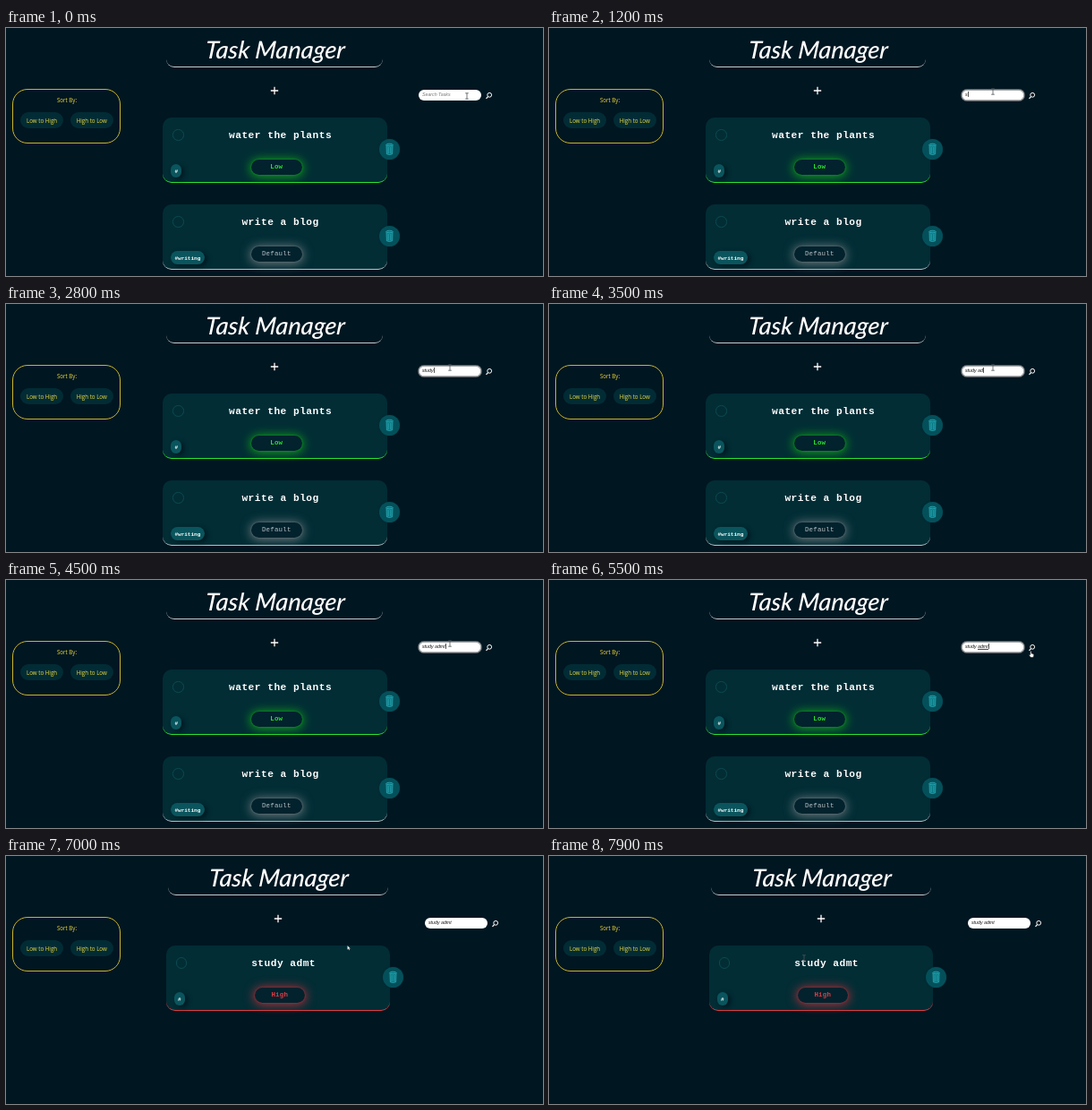
These frames come from a looping animation (600 px wide and 277 px high, 8000 ms). An HTML page:

```html
<!DOCTYPE html>
<html lang="en">
<head>
<meta charset="utf-8">
<title>Task Manager</title>
<style>
html, body { margin: 0; width: 100%; height: 100%; overflow: hidden; background: #001621; }
#app { position: relative; width: 600px; height: 277px; overflow: hidden; font: 6.2px "Open Sans", sans-serif; }
#app * { position: absolute; box-sizing: border-box; white-space: pre; }
#app .t { transform: translate(-50%, -50%); }
.mid, .find, #cards, svg { left: 0; top: 0; }
.title { left: 301px; top: 22.9px; color: #fff; font: italic 500 27px Lato, sans-serif; }
#app .title { transform: translate(-50%, -50%) skewX(-5deg); }
.line { left: 179px; top: 5px; width: 242px; height: 39px; border-bottom: 1px solid #c5cccf; border-radius: 9px; }
.res .line { left: 177px; width: 246px; }
.res .mid { left: 3.5px; }
.res .find { left: 7px; }
.sort { left: 7px; top: 68px; width: 121px; height: 61px; border: 1px solid #c9b52c; border-radius: 17px; }
.sort, .btn { color: #f0dc3c; }
.btn { top: 25px; width: 48.5px; height: 18px; border-radius: 9px; background: #022c35; }
.card { left: 175px; width: 250.5px; height: 73px; border-radius: 10px; background: #022d35; border-bottom: 1.2px solid var(--c); }
.check { left: 11px; top: 13px; width: 12.5px; height: 12.5px; border: 1px solid #0c4a50; border-radius: 50%; }
.name { left: 131.6px; top: 20px; color: #fff; font: bold 11.2px "Liberation Mono", monospace; letter-spacing: .48px; }
.level { left: 99px; top: 46.5px; width: 56.5px; height: 17.5px; border-radius: 9px; background: #02222d;
  box-shadow: 0 0 2px var(--g), 0 1px 12px 1px var(--g); color: var(--c); font: 7.4px "Liberation Mono", monospace; letter-spacing: .24px; }
.bold { font-weight: bold; }
.tag { left: 9.2px; top: 52px; height: 15px; border-radius: 7.5px; background: #0a555d;
  box-shadow: 3px 2px 5px #001820; color: #fff; font: bold 6px "Liberation Mono", monospace; }
.bin { left: 242px; top: 23.5px; width: 23px; height: 23px; border-radius: 50%; background: #04505a; box-shadow: 0 0 2px #002a33; }
.input { left: 460.5px; top: 68.5px; width: 70.5px; height: 12.5px; border-radius: 6.5px; background: #fff; }
.input.focus { box-shadow: 0 0 0 .9px #63696c, inset 0 0 0 .8px #8b9093; }
#text { left: 4.5px; top: 5.8px; transform: translateY(-50%); font: italic 5.24px "Liberation Sans", sans-serif; color: #111; }
#app #text span { position: static; }
#text .bad { border-bottom: .5px solid #444; }
#text.hint { color: #757575; }
#app #caret { position: static; display: inline-block; width: .6px; height: 6px; vertical-align: -1.2px; background: #555; }
svg { overflow: visible; }
</style>
</head>
<body>
<div id="app">
  <div class="mid">
    <div class="line"></div>
    <div class="t title">Task Manager</div>
    <svg width="1" height="1"><path d="M300 65.8v8.4M295.8 70h8.4" stroke="#fff" stroke-width="1.3"/></svg>
    <div id="cards"></div>
  </div>
  <div class="sort">
    <div class="t" style="left:60px;top:10.7px">Sort By:</div>
    <div class="btn" style="left:7.8px"><div class="t" style="left:50%;top:50%">Low to High</div></div>
    <div class="btn" style="left:63.5px"><div class="t" style="left:50%;top:50%">High to Low</div></div>
  </div>
  <div class="find">
    <div class="input" id="input"><div id="text"></div></div>
    <svg width="1" height="1" fill="none" stroke="#fff"><circle cx="540.2" cy="74.8" r="2.4"/><path d="M538.5 76.6l-2 2.2" stroke-width="1.2"/></svg>
  </div>
  <svg width="1" height="1" id="cursor">
    <path id="beam" d="M-1.8-3.2h3.6M0-3.2v6.4M-1.8 3.2h3.6" stroke="#50565a" stroke-width=".8"/>
    <path id="arrow" d="M-1.2-2.2v4.6l1.1-.9.8 1.6.8-.4-.8-1.5h1.5z" fill="#fff" stroke="#222" stroke-width=".2"/>
    <path id="hand" d="M-1.2-3.2q.6-.6 1.1 0v2.3l2.2.6q.7.3.5 1.2l-.5 2.4h-2.9l-1.7-2.3q0-.8.8-.5l.5.4z" fill="#fff" stroke="#222" stroke-width=".3"/>
  </svg>
</div>
<script>
const LOOP = 8000, FOCUS = 900, SPELL = 4800, SEARCH = 5850;
const QUERY = "study admt";
const KEYS = [1100, 1900, 2300, 2550, 2800, 3000, 3200, 3400, 3900, 4300];
const PATH = [[0, 515, 76], [800, 496, 71], [4600, 496, 71], [5300, 539, 83], [6000, 539, 83],
  [6200, 534, 84], [6400, 534, 84], [7450, 285, 114], [8000, 285, 114]];
const $ = id => document.getElementById(id);

const card = (top, name, tag, level, color, glow, weight = "bold") => `
  <div class="card" style="top:${top}px;--c:${color};--g:${glow}">
    <div class="check"></div>
    <div class="t name">${name}</div>
    <div class="level ${weight}"><div class="t" style="left:50%;top:48%">${level}</div></div>
    <div class="tag" style="width:${8.6 + tag.length * 3.6}px"><div class="t" style="left:50%;top:50%">${tag}</div></div>
    <div class="bin"><svg width="1" height="1" fill="#087984" stroke="#35b4bf" stroke-width=".7">
      <path d="M8 6.5l.4 10.3q3.1 1.4 6.2 0l.4-10.3M10.2 9v7M12.8 9v7"/><ellipse cx="11.5" cy="6.5" rx="3.7" ry="1.3"/></svg></div>
  </div>`;
const ALL = card(100.3, "water the plants", "#", "Low", "#2be52b", "#12a51c") +
  card(197.2, "write a blog", "#writing", "Default", "#b9c2c5", "#717c80", "");
const FOUND = card(100.3, QUERY, "#", "High", "#e23c44", "#b5303a");

let shown;
function showCards(found) {
  if (shown === found) return;
  shown = found;
  $("app").className = found ? "res" : "";
  $("cards").innerHTML = found ? FOUND : ALL;
}

function showInput(t) {
  const n = KEYS.filter(k => k <= t).length;
  const focus = t >= FOCUS && t < SEARCH;
  const last = n ? KEYS[n - 1] : FOCUS;
  const caret = focus && (t - last) % 1060 < 530 ? '<span id="caret"></span>' : "";
  const typed = QUERY.slice(0, n);
  const word = focus && t >= SPELL ? typed.replace("admt", '<span class="bad">admt</span>') : typed;
  $("input").className = focus ? "input focus" : "input";
  $("text").className = n ? "" : "hint";
  $("text").innerHTML = n ? word + caret : caret + "Search Tasks";
}

function showCursor(t) {
  const i = PATH.findIndex(p => p[0] > t), [t0, x0, y0] = PATH[i - 1], [t1, x1, y1] = PATH[i];
  const u = (t - t0) / (t1 - t0), e = u * u * (3 - 2 * u);
  const x = x0 + (x1 - x0) * e, y = y0 + (y1 - y0) * e;
  const overText = t < SEARCH ? x < 531 : x > 274 && x < 346 && y > 110;
  const kind = overText ? "beam" : x > 535.5 && y > 70 ? "hand" : "arrow";
  for (const id of ["beam", "arrow", "hand"]) $(id).style.display = id === kind ? "" : "none";
  $("cursor").style.transform = `translate(${x}px,${y}px)`;
}

function draw() {
  const t = performance.now() % LOOP;
  showCards(t >= SEARCH);
  showInput(t);
  showCursor(t);
  requestAnimationFrame(draw);
}
draw();
</script>
</body>
</html>
```
